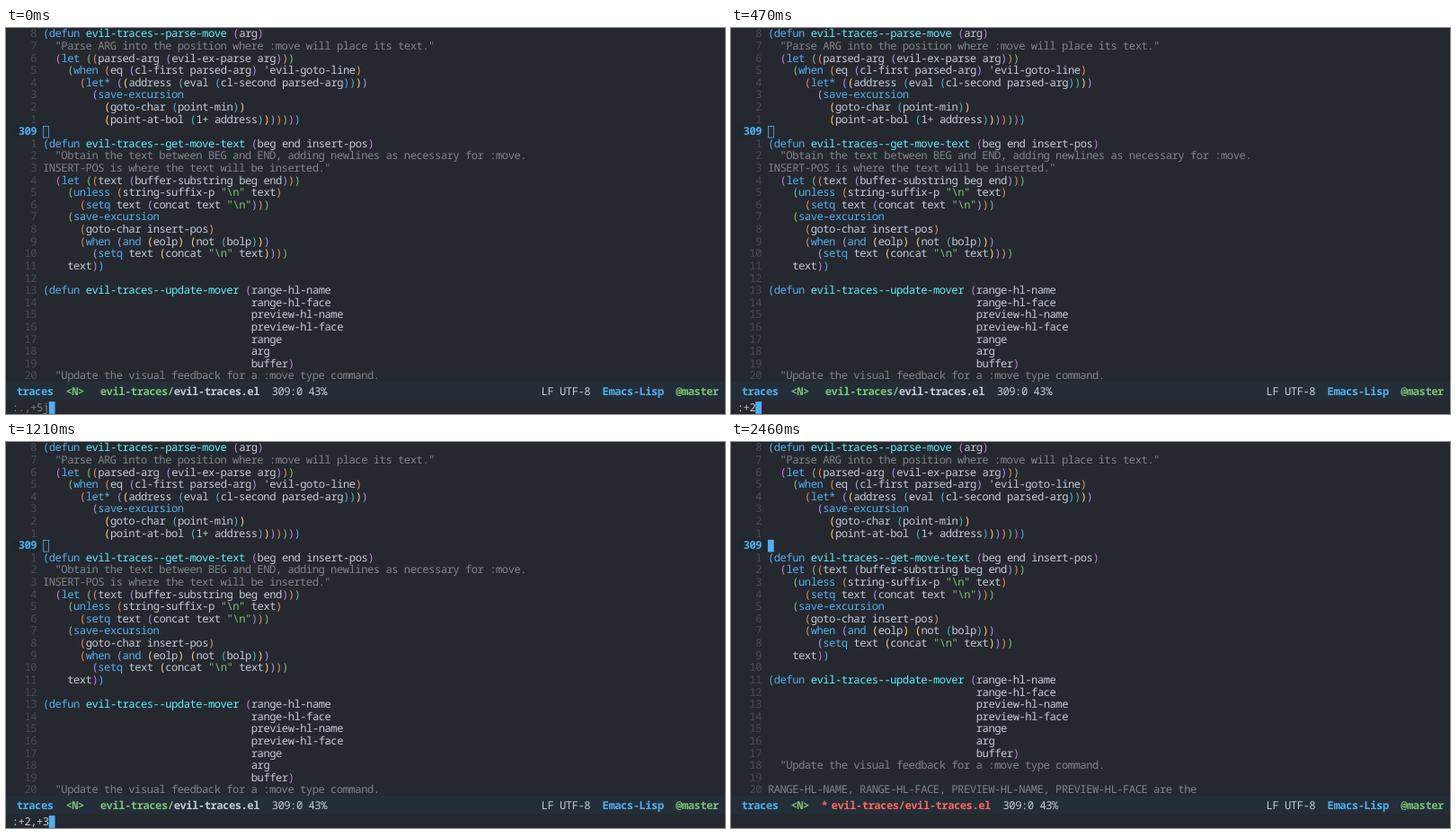
An HTML page that plays this animation: 800 px wide and 430 px high, repeating every 3.46 s.

```html
<!DOCTYPE html>
<html lang="en">
<head>
<meta charset="utf-8">
<title>Ex command preview</title>
<style>
  html, body { margin: 0; width: 100%; height: 100%; overflow: hidden; background: #26282f; }
  svg { display: block; width: 800px; height: 430px; }
  text {
    font: 500 12.2px "Noto Sans Mono", "DejaVu Sans Mono", monospace;
    letter-spacing: -0.5px;
    font-variant-ligatures: none;
    text-rendering: geometricPrecision;
    white-space: pre;
  }
  .bold { font-weight: 700; }
</style>
</head>
<body>
<svg id="stage" viewBox="0 0 800 430"></svg>
<script>
const CELL = 6.82, ROW = 13.61, BASELINE = 10.3, GUTTER = 6, FRINGE = 7;
const MODELINE_Y = 394, MODELINE_H = 20.5, MINI_Y = 416.2;
const LOOP = 3460, CURRENT_ROW = 8, VISIBLE_ROWS = 29;

const color = {
  bg: '#26282f', bar: '#242e38', fg: '#c3cad6', dim: '#484b54', doc: '#80848a',
  blue: '#51afef', cyan: '#5cefff', green: '#7bc275', red: '#ff665c', shade: '#20282d'
};
const parens = ['#51afef', '#c57bdb', '#7bc275', '#e69055', '#a991f1', '#fcce7b', '#4db5bd'];
const keywords = new Set(['defun', 'let', 'let*', 'when', 'unless', 'save-excursion', 'setq', 'and']);

const source = String.raw`(defun evil-traces--parse-move (arg)
  "Parse ARG into the position where :move will place its text."
  (let ((parsed-arg (evil-ex-parse arg)))
    (when (eq (cl-first parsed-arg) 'evil-goto-line)
      (let* ((address (eval (cl-second parsed-arg))))
        (save-excursion
          (goto-char (point-min))
          (point-at-bol (1+ address)))))))

(defun evil-traces--get-move-text (beg end insert-pos)
  "Obtain the text between BEG and END, adding newlines as necessary for :move.
INSERT-POS is where the text will be inserted."
  (let ((text (buffer-substring beg end)))
    (unless (string-suffix-p "\n" text)
      (setq text (concat text "\n")))
    (save-excursion
      (goto-char insert-pos)
      (when (and (eolp) (not (bolp)))
        (setq text (concat "\n" text))))
    text))

(defun evil-traces--update-mover (range-hl-name
                                  range-hl-face
                                  preview-hl-name
                                  preview-hl-face
                                  range
                                  arg
                                  buffer)
  "Update the visual feedback for a :move type command.

RANGE-HL-NAME, RANGE-HL-FACE, PREVIEW-HL-NAME, PREVIEW-HL-FACE are the`.split('\n');
const DOOMED = [10, 11];
const remaining = source.filter((_, i) => !DOOMED.includes(i));

// cursor: column in the command line, or -1 when it is back in the buffer
const steps = [
  { at: 0, command: ':.,+5j', cursor: 7, ink: color.doc },
  { at: 230, command: ':+', cursor: 3 },
  { at: 470, command: ':+2', cursor: 4 },
  { at: 710, command: ':+2,', cursor: 5 },
  { at: 960, command: ':+2,+', cursor: 6 },
  { at: 1210, command: ':+2,+3', cursor: 7 },
  { at: 1460, command: ':+2,+3d', cursor: 1, preview: true },
  { at: 2460, command: '', cursor: -1, done: true }
];

const escapeText = s => s.replace(/&/g, '&amp;').replace(/</g, '&lt;');
const label = (x, y, s, fill, bold) =>
  `<text x="${x.toFixed(2)}" y="${y.toFixed(2)}" fill="${fill}"${bold ? ' class="bold"' : ''}>${escapeText(s)}</text>`;
const rect = (x, y, w, h, fill) =>
  `<rect x="${x}" y="${y}" width="${w}" height="${h}" fill="${fill}"/>`;

function drawCode(lines, preview) {
  let depth = 0, afterDefun = false, out = '';
  lines.slice(0, VISIBLE_ROWS).forEach((line, row) => {
    const y = row * ROW + BASELINE;
    const put = (col, s, fill, bold) => { out += label((GUTTER + col) * CELL, y, s, fill, bold); };
    const current = row === CURRENT_ROW;
    const number = current ? '309' : String(Math.abs(row - CURRENT_ROW));
    put(-1 - number.length, number, current ? color.blue : color.dim, current);

    if (/^\s*"?[A-Z]/.test(line)) {
      const doomed = preview && DOOMED.includes(row);
      const indent = line.search(/\S/);
      put(indent, line.slice(indent), doomed ? color.red : color.doc);
      return;
    }
    for (const { 0: token, index } of line.matchAll(/"[^"]*"|[()]|[^\s()"]+/g)) {
      let fill = color.fg;
      if (token === '(') fill = parens[depth++ % parens.length];
      else if (token === ')') fill = parens[--depth % parens.length];
      else if (token[0] === '"') fill = color.green;
      else if (keywords.has(token)) fill = color.blue;
      else if (afterDefun) fill = color.cyan;
      afterDefun = token === 'defun';
      put(index, token, fill);
    }
  });
  return out;
}

function drawModeline(done) {
  const y = 409.1, shift = done ? CELL : 0;
  const put = (x, s, fill, bold = true) => label(x, y, s, fill, bold);
  return rect(0, MODELINE_Y, 800, MODELINE_H, color.bar) +
    put(11.7, 'traces', color.blue) +
    put(66.4, '<N>', color.green) +
    (done ? put(100.5, '*', color.red) : '') +
    put(104.8 + shift, 'evil-traces/', done ? color.red : color.green) +
    put(104.8 + shift + 12 * CELL, 'evil-traces.el', done ? color.red : color.fg) +
    put(295.7 + shift, '309:0 43%', color.fg, false) +
    put(595.6, 'LF UTF-8', color.fg, false) +
    put(663.6, 'Emacs-Lisp', color.blue) +
    put(745.2, '@master', color.green);
}

function drawCommand({ command, cursor, ink = color.fg }) {
  const y = MINI_Y + BASELINE;
  let out = label(CELL, y, command, ink);
  if (cursor > 0) out += rect(cursor * CELL, MINI_Y, CELL, ROW, color.blue);
  if (cursor === 1) out += label(CELL, y, command[0], color.bg);
  return out;
}

function drawBufferCursor(solid) {
  const x = GUTTER * CELL, y = CURRENT_ROW * ROW;
  return solid ? rect(x, y, CELL, ROW, color.blue)
    : `<rect x="41.5" y="109.5" width="6" height="12.6" fill="none" stroke="${color.blue}" stroke-width="0.8"/>`;
}

function render(step) {
  const x = GUTTER * CELL;
  stage.innerHTML =
    rect(FRINGE, CURRENT_ROW * ROW, x - FRINGE, ROW, color.shade) +
    (step.preview ? rect(x, DOOMED[0] * ROW, 800 - FRINGE - x, 2 * ROW, color.shade) : '') +
    drawCode(step.done ? remaining : source, step.preview) +
    drawBufferCursor(step.done) +
    drawModeline(step.done) +
    drawCommand(step);
}

const stage = document.getElementById('stage');
const start = performance.now();
let shown;

function tick() {
  const time = (performance.now() - start) % LOOP;
  const step = steps.findLast(s => s.at <= time);
  if (step !== shown) render(shown = step);
  requestAnimationFrame(tick);
}
tick();
</script>
</body>
</html>
```
